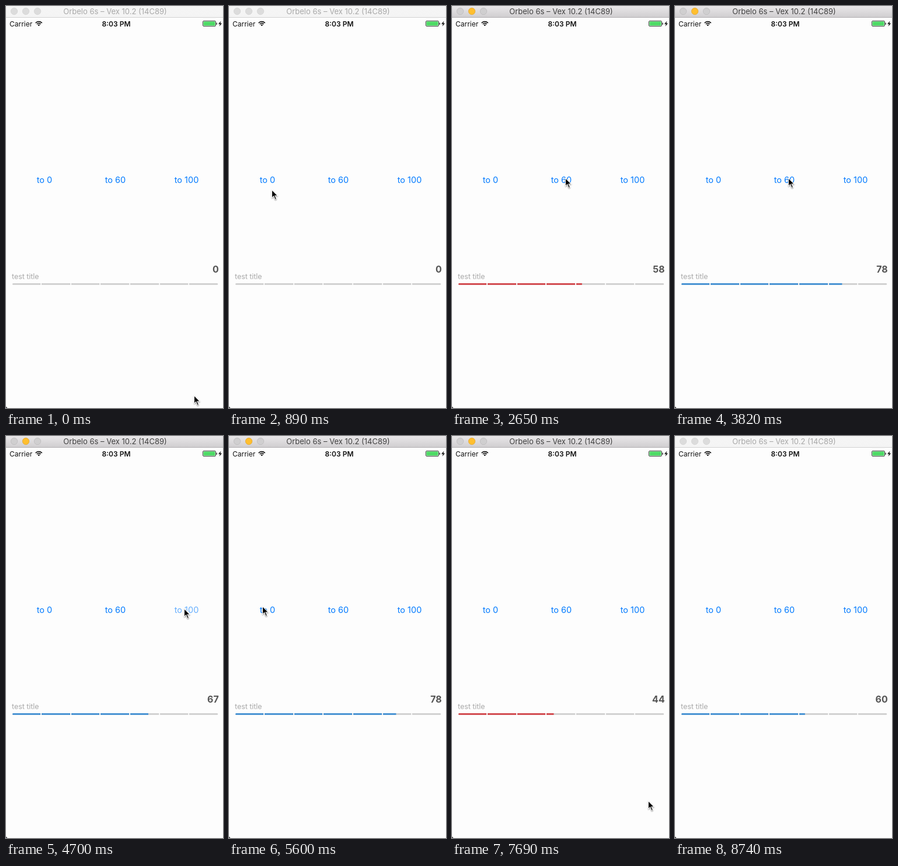
Write an HTML page with a canvas that moves like this. It is 372 px wide and 686 px high and loops after 8.84 s.

```html
<!DOCTYPE html>
<html lang="en">
<head>
<meta charset="utf-8">
<title>Segmented progress</title>
<style>
  html, body { margin: 0; width: 100%; height: 100%; overflow: hidden; background: #fdfdfd; }
  canvas { display: block; width: 372px; height: 686px; }
</style>
</head>
<body>
<canvas id="stage" width="372" height="686"></canvas>
<script>
const ctx = document.getElementById('stage').getContext('2d');
const LOOP = 8840;
const FRAME_MS = 147.4;
const UNITS_PER_MS = 0.0648;
const SEGMENTS = 7;
const ACTIVE_FROM = 1170, ACTIVE_TO = 8740;

const toZero = { label: 'to 0', value: 0, x: 66, hover: { x: 57, y: 290 } };
const toSixty = { label: 'to 60', value: 60, x: 187.5, hover: { x: 194, y: 293 } };
const toHundred = { label: 'to 100', value: 100, x: 309.5, hover: { x: 305, y: 294 } };
const buttons = [toZero, toSixty, toHundred];

// The pointer travels for `travel` ms and then rests for `rest` ms before each click.
const clicks = [
  { at: 1190, button: toZero, travel: 1040, rest: 150 },
  { at: 1745, button: toSixty, travel: 300, rest: 150 },
  { at: 2850, button: toHundred, travel: 170, rest: 10 },
  { at: 3497, button: toSixty, travel: 350, rest: 150 },
  { at: 4450, button: toHundred, travel: 300, rest: 50 },
  { at: 5266, button: toZero, travel: 400, rest: 140 },
  { at: 6980, button: toSixty, travel: 500, rest: 210 }
];
const entry = { x: 322, y: 664 };
const exit = { x: 345, y: 644, start: 7130, end: 7760 };

const clamp = (v, lo = 0, hi = 1) => Math.min(hi, Math.max(lo, v));
const smooth = p => p * p * (3 - 2 * p);
const mix = (a, b, p) => a + (b - a) * p;

function text(str, x, y, size, color, align = 'left', weight = 400) {
  ctx.font = `${weight} ${size}px Inter, "Open Sans", sans-serif`;
  ctx.fillStyle = color;
  ctx.textAlign = align;
  ctx.fillText(str, x, y);
}

function box(x, y, w, h, radius, color) {
  ctx.beginPath();
  ctx.roundRect(x, y, w, h, radius);
  ctx.fillStyle = color;
  ctx.fill();
}

function polygon(points, color) {
  ctx.beginPath();
  points.forEach(([x, y]) => ctx.lineTo(x, y));
  ctx.closePath();
  ctx.fillStyle = color;
  ctx.fill();
}

function dot(x, fill, border) {
  ctx.beginPath();
  ctx.arc(x, 9, 5.7, 0, Math.PI * 2);
  ctx.fillStyle = fill;
  ctx.fill();
  ctx.strokeStyle = border;
  ctx.lineWidth = 0.7;
  ctx.stroke();
}

function pointerAt(t) {
  if (t > exit.end) return null;
  const moves = clicks.map(({ at, button, travel, rest }) =>
    ({ ...button.hover, start: at - rest - travel, end: at - rest }));
  return [...moves, exit].reduce((from, to) => {
    const p = smooth(clamp((t - to.start) / (to.end - to.start)));
    return { x: mix(from.x, to.x, p), y: mix(from.y, to.y, p) };
  }, entry);
}

// Segments fill or empty one after another, each easing in.
function segmentLevels(from, to, elapsed) {
  const level = (value, i) => clamp(value * SEGMENTS / 100 - i);
  const levels = Array.from({ length: SEGMENTS }, (_, i) => level(from, i));
  const order = [...levels.keys()];
  if (to < from) order.reverse();
  let left = elapsed;
  for (const i of order) {
    const change = level(to, i) - levels[i];
    if (Math.abs(change) < 1e-6) continue;
    const duration = mix(80, 200, Math.abs(change));
    levels[i] += change * clamp(left / duration) ** 1.6;
    left = Math.max(0, left - duration);
  }
  return levels;
}

function progressAt(t) {
  let from = 0, to = 0, start = 0;
  for (const { at, button } of clicks) {
    if (at > t) break;
    from = to;
    to = button.value;
    start = at;
  }
  const travelled = Math.min(Math.abs(to - from), (t - start) * UNITS_PER_MS);
  return {
    count: Math.floor(from + Math.sign(to - from) * travelled),
    levels: segmentLevels(from, to, t - start)
  };
}

function drawTitleBar(active) {
  const shade = ctx.createLinearGradient(0, 0, 0, 19);
  shade.addColorStop(0, active ? '#e9e7e9' : '#f5f5f5');
  shade.addColorStop(1, active ? '#d0ced0' : '#f4f4f4');
  ctx.fillStyle = shade;
  ctx.fillRect(0, 0, 372, 19);
  ctx.fillStyle = active ? '#b2b0b2' : '#d3d3d3';
  ctx.fillRect(0, 19, 372, 1);
  const grey = active ? '#d0cfd0' : '#dcdcdc';
  const border = active ? '#b9b8b9' : '#d0d0d0';
  dot(14, grey, border);
  dot(34, active ? '#ffbf2f' : grey, active ? '#e0a127' : border);
  dot(54, grey, border);
  text('Orbelo 6s – Vex 10.2 (14C89)', 187, 14, 13, active ? '#404040' : '#a8a8a8', 'center');
}

function drawWifi(x, y) {
  ctx.strokeStyle = '#111';
  // The innermost arc is wide enough to read as a filled wedge.
  for (const [radius, width] of [[1.3, 2.6], [4.6, 1.6], [7.6, 1.6]]) {
    ctx.lineWidth = width;
    ctx.beginPath();
    ctx.arc(x, y, radius, -Math.PI * 0.76, -Math.PI * 0.24);
    ctx.stroke();
  }
}

function drawStatusBar() {
  text('Carrier', 6, 34.5, 12, '#111');
  text('8:03 PM', 189, 34.5, 12, '#111', 'center', 600);
  drawWifi(56.2, 34.2);
  ctx.beginPath();
  ctx.roundRect(337.5, 25.5, 22, 9, 1.5);
  ctx.lineWidth = 1;
  ctx.strokeStyle = '#444';
  ctx.stroke();
  box(338.5, 26.5, 20, 7, 0.5, '#4cd964');
  box(360.5, 28.5, 1.4, 3.5, [0, 1, 1, 0], '#333');
  polygon([[368.5, 25.5], [364, 30.7], [366.8, 30.7], [365.7, 34.8], [370.2, 29.4], [367.4, 29.4]], '#111');
}

function drawButtons(t) {
  for (const button of buttons) {
    const press = clicks.find(c => c.button === button && t > c.at - 90 && t < c.at + 220);
    ctx.globalAlpha = press ? mix(0.2, 1, clamp((t - press.at - 20) / 200)) : 1;
    text(button.label, button.x, 301.5, 14.5, '#007aff', 'center');
  }
  ctx.globalAlpha = 1;
}

function drawProgress({ count, levels }) {
  text('test title', 10, 466, 12.4, '#a9a9a9');
  text(count, 364.7, 455, 16, '#555', 'right', 700);
  const color = count < 60 ? '#d24d52' : '#4b94d3';
  const edge = i => Math.round(10.5 + 50.6 * i);
  levels.forEach((level, i) => {
    const x = edge(i);
    const width = edge(i + 1) - x - 1.7;
    const head = i === 0 ? 1.5 : 0;
    const tail = i === SEGMENTS - 1 ? 1.5 : 0;
    const corners = [head, tail, tail, head];
    box(x, 473, width, 3, corners, '#d2d2d2');
    if (level <= 0) return;
    ctx.save();
    ctx.beginPath();
    ctx.rect(x, 472, width * level, 5);
    ctx.clip();
    box(x, 473, width, 3, corners, color);
    ctx.restore();
  });
}

function drawPointer({ x, y }) {
  const arrow = [[1, 2], [1, 13.2], [3.8, 10.5], [6.5, 16.7], [7.8, 16.2], [5.2, 10.2], [9.2, 10.2]];
  ctx.save();
  ctx.translate(Math.round(x), Math.round(y));
  ctx.shadowColor = 'rgba(0,0,0,.4)';
  ctx.shadowBlur = 2;
  ctx.shadowOffsetY = 1;
  polygon(arrow, '#fff');
  ctx.strokeStyle = '#fff';
  ctx.lineWidth = 2;
  ctx.stroke();
  ctx.shadowColor = 'transparent';
  polygon(arrow, '#000');
  ctx.restore();
}

function draw(now) {
  const raw = now % LOOP;
  const t = Math.floor((raw + 13) / FRAME_MS) * FRAME_MS;
  ctx.fillStyle = '#fdfdfd';
  ctx.fillRect(0, 0, 372, 686);
  drawTitleBar(t > ACTIVE_FROM && raw < ACTIVE_TO);
  drawStatusBar();
  drawButtons(t);
  drawProgress(progressAt(t));
  polygon([[0, 683.5], [0, 686], [2.5, 686]], '#333');
  const pointer = pointerAt(t);
  if (pointer) drawPointer(pointer);
}

const begin = performance.now();
function tick() {
  draw(performance.now() - begin);
  requestAnimationFrame(tick);
}
tick();
</script>
</body>
</html>
```
